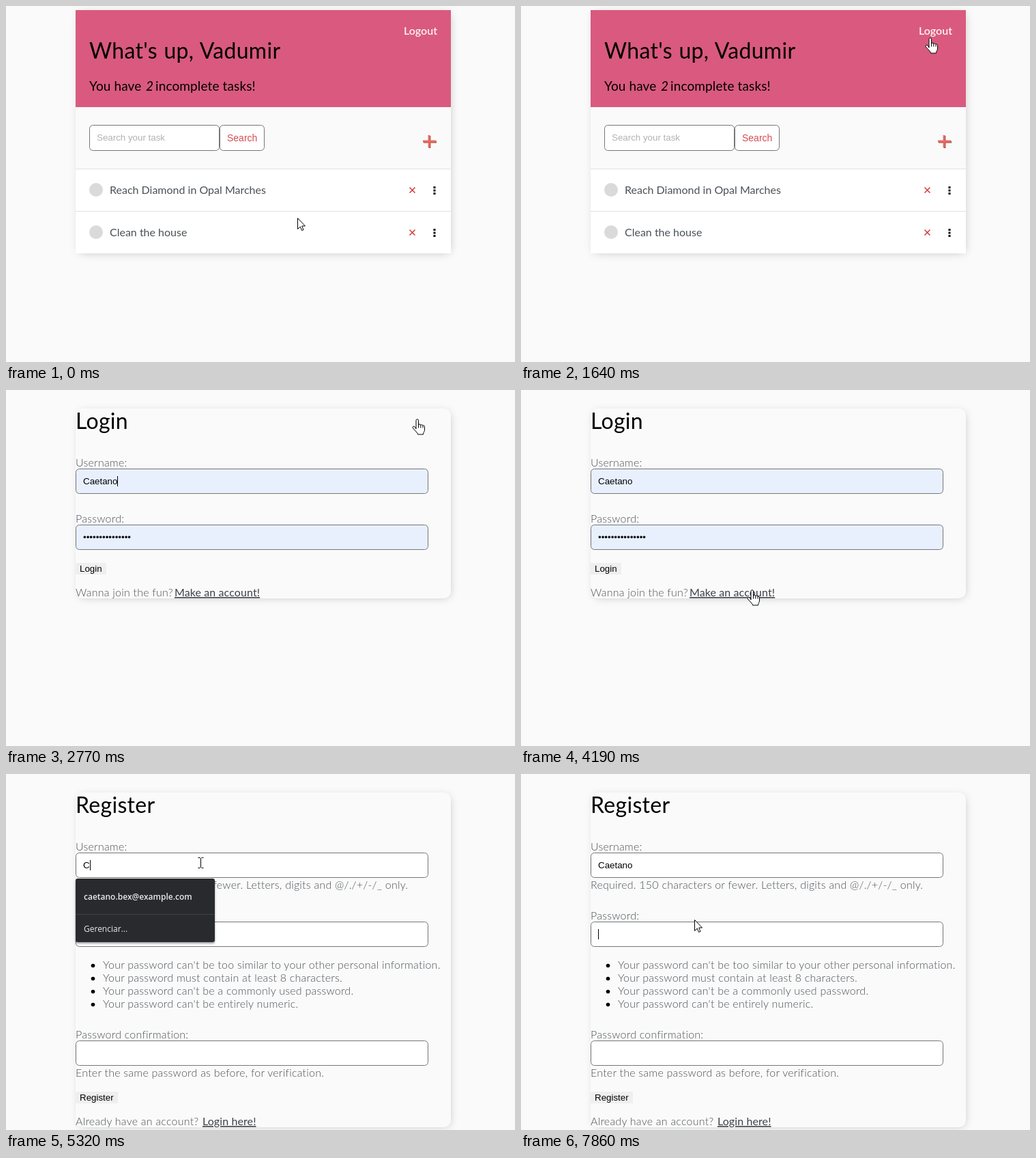
Animation, 746 px wide and 521 px high, one loop 8 s. Source, as an HTML page:

```html
<!DOCTYPE html>
<html lang="en">
<head>
<meta charset="utf-8">
<title>Task list</title>
<style>
html, body { margin: 0; width: 100%; height: 100%; overflow: hidden; background: #fafafa; }
.page { position: absolute; left: 0; top: 0; visibility: hidden; }
.card { position: absolute; left: 102px; width: 550px; border-radius: 10px; background: #fafafa;
  box-shadow: 2px 2px 13px -4px rgba(0, 0, 0, .25); }
svg { position: absolute; left: 0; top: 0; width: 746px; height: 521px; }
text { font: 300 16px Lato, sans-serif; fill: #4b5156; letter-spacing: .22px; white-space: pre; }
.h1 { font-size: 32px; font-weight: 400; fill: #000; letter-spacing: .3px; word-spacing: 1px; }
.h3 { font-size: 19px; font-weight: 400; fill: #000; letter-spacing: .12px; }
.task { font-weight: 400; letter-spacing: 0; }
.exit { font-weight: 600; fill: #fff4f6; letter-spacing: 0; }
.link { font-weight: 400; fill: #3c4146; letter-spacing: .1px; text-decoration: underline; }
.form { font: 13.333px "Liberation Sans", Arial, sans-serif; fill: #000; letter-spacing: 0; }
.hint { fill: #b4b0b2; }
.find { font-size: 14px; fill: #d64c52; }
.menu text { font: 12px "Open Sans", sans-serif; fill: #e8eaed; letter-spacing: 0; }
.menu .bold { font-weight: 600; }
.menu { filter: drop-shadow(0 2px 1.5px rgba(0, 0, 0, .4)); }
.field { fill: #fff; stroke: #767676; }
.filled { fill: #e8f0fe; }
.btn { fill: #efefef; }
.cursor path { fill: #fff; stroke: #000; stroke-linejoin: round; }
.cursor #beam { fill: none; }
</style>
</head>
<body>
<div class="page" id="todo">
  <div class="card" style="top:6px;height:356px;border-radius:0"></div>
  <svg viewBox="0 0 746 521">
    <rect x="102" y="6" width="550" height="142" fill="#d95a7e"/>
    <text class="exit" x="583" y="42">Logout</text>
    <text class="h1" x="122" y="77">What's up, Vadumir</text>
    <text class="h3" x="122" y="124">You have</text>
    <text class="h3" x="205" y="124" style="font-style:italic">2</text>
    <text class="h3" x="219" y="124">incomplete tasks!</text>
    <rect class="field" x="122.5" y="174.5" width="190" height="37" rx="5"/>
    <text class="form hint" x="133" y="197">Search your task</text>
    <rect class="field" x="313.5" y="174.5" width="65" height="37" rx="5"/>
    <text class="form find" x="324" y="198">Search</text>
    <path d="M612 199h19M621 190v18" stroke="#a2524b" stroke-width="2.800"/>
    <path d="M611 198h19M620 189v18" stroke="#e96a61" stroke-width="2.800"/>
    <rect x="102" y="238" width="550" height="124" fill="#fff"/>
    <path d="M102 238.500h550M102 300.500h550" stroke="#e2e2e8"/>
    <g id="row">
      <circle cx="132" cy="269" r="10" fill="#dadada"/>
      <path d="M591.500 265.500l8 8m0 -8l-8 8" stroke="#d2403c" stroke-width="1.600"/>
      <path d="M626.500 264h3v3h-3zm0 4.500h3v3h-3zm0 4.500h3v3h-3z"/>
    </g>
    <use href="#row" y="62"/>
    <text class="task" x="152" y="275">Reach Diamond in Opal Marches</text>
    <text class="task" x="152" y="337">Clean the house</text>
  </svg>
</div>

<div class="page" id="login">
  <div class="card" style="top:27px;height:278px"></div>
  <svg viewBox="0 0 746 521">
    <text class="h1" x="102" y="57">Login</text>
    <text x="102" y="112">Username:</text>
    <rect class="field filled" x="102.5" y="115.5" width="516" height="36" rx="5"/>
    <text class="form" id="saved" x="113" y="138">Caetano</text>
    <text x="102" y="194">Password:</text>
    <rect class="field filled" x="102.5" y="197.5" width="516" height="36" rx="5"/>
    <text class="form" x="113" y="220">•••••••••••••••</text>
    <rect class="btn" x="102" y="253" width="45" height="17"/>
    <text class="form" x="108" y="266">Login</text>
    <text x="102" y="302">Wanna join the fun?</text>
    <text class="link" x="247" y="302">Make an account!</text>
  </svg>
</div>

<div class="page" id="register">
  <div class="card" style="top:27px;height:490px"></div>
  <svg viewBox="0 0 746 521">
    <text class="h1" x="102" y="57">Register</text>
    <text x="102" y="112">Username:</text>
    <rect class="field" x="102.5" y="115.5" width="516" height="36" rx="5"/>
    <text class="form" id="typed" x="113" y="138"></text>
    <text x="102" y="168">Required. 150 characters or fewer. Letters, digits and @/./+/-/_ only.</text>
    <text x="102" y="213">Password:</text>
    <rect class="field" x="102.5" y="216.5" width="516" height="36" rx="5"/>
    <g id="rules"></g>
    <text x="102" y="387">Password confirmation:</text>
    <rect class="field" x="102.5" y="390.5" width="516" height="36" rx="5"/>
    <text x="102" y="443">Enter the same password as before, for verification.</text>
    <rect class="btn" x="102" y="465" width="62" height="17"/>
    <text class="form" x="108" y="478">Register</text>
    <text x="102" y="514">Already have an account?</text>
    <text class="link" x="288" y="514">Login here!</text>
    <g class="menu" id="menu">
      <rect x="102" y="153" width="204" height="93" rx="3" fill="#292a2d"/>
      <path d="M102 205.500h204" stroke="#3f4145"/>
      <text class="bold" x="114" y="184">caetano.bex@example.com</text>
      <text x="114" y="231">Gerenciar...</text>
    </g>
  </svg>
</div>

<svg viewBox="0 0 746 521">
  <rect id="caret" width="1" height="15"/>
  <g class="cursor" id="cursor">
    <path id="arrow" d="M.5 .5V16.500L4.200 13L6.600 18.500L9 17.500L6.700 12H11.500Z"/>
    <path id="hand" d="M-1 15V2.500a1.750 1.750 0 0 1 3.500 0V9.500q0 -1.500 1.600 -1.500t1.700 1.800q.2 -1 1.600 -1t1.600 1.800q.2 -.8 1.200 -.8t1.300 1.800V16q0 2 -1 3.500t-1 3.500H1.500q0 -1.500 -1.500 -3L-5.500 14q-1 -1.800 .3 -2.600t2.400 .6ZM2.500 9v4.500M5.800 10v3.500M9 11v2.500"/>
    <path id="beam" d="M-3.500 -7.500h3M1.500 -7.500h3M.5 -7V7M-3.500 7.500h3M1.500 7.500h3"/>
  </g>
  <circle id="click" r="12" fill="#ff0" fill-opacity=".47"/>
</svg>

<script>
const LOOP = 8000;
const NAME = 'Caetano';
const KEYS = [5320, 5520, 5650, 5850, 5950, 6050, 6250];
const PAGES = [['todo', 0], ['login', 2770], ['register', 4340]];
const CLICKS = [[2310, 2440], [4060, 4190]];
const MENU = [[5320, 6720]];
// [on, off, field]
const CARETS = [
  [2770, 3300, 'saved'], [3860, 4190, 'saved'],
  [4340, 4800, 'typed'], [5320, 6720, 'typed'],
  [6720, 7250, 'password'], [7780, LOOP, 'password']
];

const $ = id => document.getElementById(id);
const show = (el, on) => { el.style.visibility = on ? 'visible' : 'hidden'; };
const during = (spans, t) => spans.find(([a, b]) => t >= a && t < b);
const inBox = (x, y, [l, t, r, b]) => x >= l && x <= r && y >= t && y <= b;

const out = p => 1 - (1 - p) ** 2;
const inOut = p => p * p * (3 - 2 * p);
const line = (x0, y0, x1, y1, ease) => p => {
  const e = ease(p);
  return [x0 + (x1 - x0) * e, y0 + (y1 - y0) * e];
};
const through = pts => p => pts[Math.round(p * (pts.length - 1))];

const sweep = [[427, 310], [420, 309], [402, 307], [366, 305], [310, 303], [252, 300],
  [212, 297], [196, 290], [200, 279], [222, 264], [245, 254], [262, 246], [532, 130]];

// Each move advances in n hard steps; boxes tell where the pointer changes shape.
const MOVES = [
  { a: 400, b: 1150, n: 12, at: through(sweep), hand: [], beam: [] },
  { a: 1230, b: 1780, n: 9, at: line(532, 130, 602, 42, out), hand: [[582, 27, 633, 47]], beam: [] },
  { a: 3170, b: 3660, n: 8, at: line(602, 42, 338, 292, inOut), hand: [[247, 286, 371, 305]],
    beam: [[102, 115, 619, 152], [102, 197, 619, 234]] },
  { a: 4540, b: 4800, n: 5, at: line(338, 292, 285, 130, out), hand: [],
    beam: [[102, 115, 619, 152], [102, 216, 619, 253]] },
  { a: 7320, b: 7860, n: 8, at: line(285, 130, 254, 213, inOut), hand: [],
    beam: [[102, 115, 619, 152], [102, 154, 583, 172]] }
];

const rules = ["Your password can't be too similar to your other personal information.",
  'Your password must contain at least 8 characters.',
  "Your password can't be a commonly used password.",
  "Your password can't be entirely numeric."];
$('rules').innerHTML = rules.map((s, i) =>
  `<circle cx="127.5" cy="${280.5 + 19 * i}" r="2.8"/><text x="142" y="${285 + 19 * i}">${s}</text>`).join('');

function pointer(t) {
  const m = MOVES.filter(m => t >= m.a).pop() || MOVES[0];
  const step = t < m.a ? 0 : Math.min(m.n, Math.round((t - m.a) / (m.b - m.a) * (m.n - 1)) + 1);
  const [x, y] = m.at(step / m.n).map(Math.round);
  const hit = boxes => boxes.some(b => inBox(x, y, b));
  return { x, y, kind: hit(m.hand) ? 'hand' : hit(m.beam) ? 'beam' : 'arrow' };
}

function draw(t) {
  const page = PAGES.filter(p => t >= p[1]).pop()[0];
  PAGES.forEach(([id]) => show($(id), id === page));
  // The menu must be hidden with its page, so it inherits nothing here.
  show($('menu'), during(MENU, t));

  const text = NAME.slice(0, KEYS.filter(k => t >= k).length);
  if ($('typed').textContent !== text) $('typed').textContent = text;

  const caret = during(CARETS, t);
  show($('caret'), caret);
  if (caret) {
    const el = $(caret[2]);
    const w = el && el.textContent ? el.getComputedTextLength() : 0;
    $('caret').setAttribute('x', Math.round(113 + w));
    $('caret').setAttribute('y', el ? 126 : 227);
  }

  const { x, y, kind } = pointer(t);
  $('cursor').setAttribute('transform', `translate(${x} ${y})`);
  ['arrow', 'hand', 'beam'].forEach(id => show($(id), id === kind));
  $('click').setAttribute('cx', x);
  $('click').setAttribute('cy', y);
  show($('click'), during(CLICKS, t));
}

const start = performance.now();
function tick() {
  draw((performance.now() - start) % LOOP);
  requestAnimationFrame(tick);
}
tick();
</script>
</body>
</html>
```
